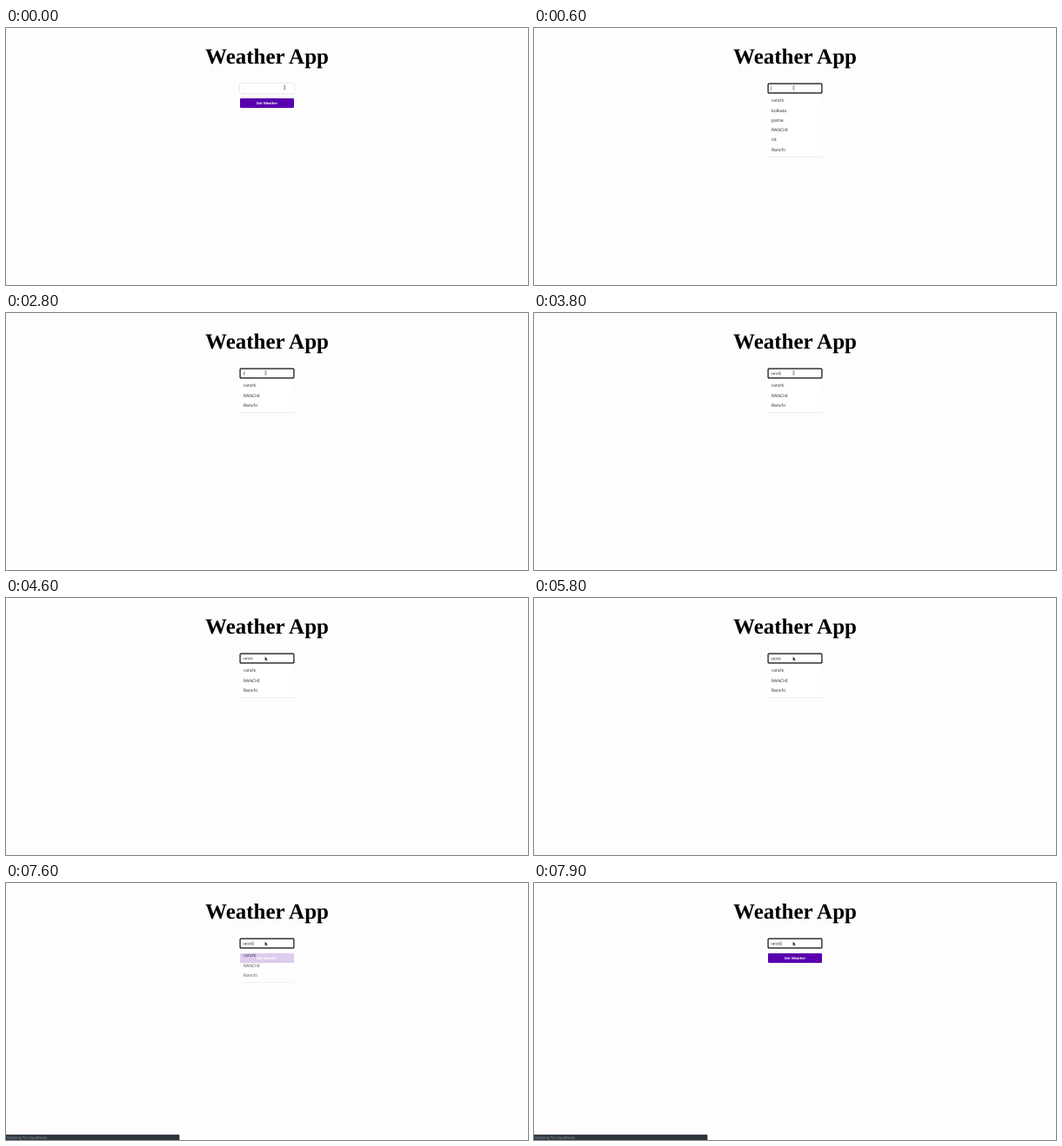
An HTML page for the animation above (8000 ms loop, 600x296 px).

```html
<!DOCTYPE html>
<html lang="en">
<head>
<meta charset="utf-8">
<title>Weather App</title>
<style>
  html, body { margin: 0; width: 100%; height: 100%; overflow: hidden; background: #fdfdfd; }
  svg { display: block; width: 100%; height: 100%; }
  text { text-rendering: geometricPrecision; white-space: pre; }
  .title { font: bold 25px "Liberation Serif", serif; text-anchor: middle; }
  .label { font: bold 4.17px "Liberation Sans", sans-serif; text-anchor: middle; fill: #fff; }
  .typed { font: 4.17px "Liberation Sans", sans-serif; fill: #222; }
  .menu text { font: 500 5px "Noto Sans", sans-serif; fill: #2a2a2a; }
  .menu rect { fill: #fff; filter: drop-shadow(0 .5px .6px rgba(0, 0, 0, .38)); }
  .status text { font: 4.75px "Noto Sans", sans-serif; fill: #8c979e; }
  .field { fill: #fff; filter: drop-shadow(0 0 1px rgba(0, 0, 0, .2)); }

  .anim { animation: 8s step-end infinite; }
  .ring { animation-name: ring; }
  .full { animation-name: full; }
  .short { animation-name: short; }
  .edge { animation-name: type; }
  .caret { animation-name: blink; }
  .squiggle { animation-name: squiggle; }
  .beam { animation-name: beam; }
  .arrow { animation-name: arrow; }
  .status { animation-name: status; }

  @keyframes ring { 0% { opacity: 0 } 7.5%, 100% { opacity: 1 } }
  @keyframes full { 0% { opacity: 0 } 7.5% { opacity: 1 } 35%, 100% { opacity: 0 } }
  @keyframes short {
    0% { opacity: 0 } 35% { opacity: 1 }
    95% { opacity: .8 } 96.25% { opacity: .5 } 97.5% { opacity: .2 } 98.75%, 100% { opacity: 0 }
  }
  @keyframes type {
    0% { transform: translateX(0) }
    35% { transform: translateX(1.45px) }
    37.5% { transform: translateX(3.75px) }
    41.25% { transform: translateX(6.05px) }
    43.75% { transform: translateX(8.15px) }
    47.5% { transform: translateX(10.45px) }
    50%, 100% { transform: translateX(11.6px) }
  }
  @keyframes blink {
    0% { opacity: 0 } 7.5% { opacity: 1 } 15% { opacity: 0 } 22.5% { opacity: 1 }
    30% { opacity: 0 } 35% { opacity: 1 } 57.5% { opacity: 0 } 65% { opacity: 1 }
    72.5% { opacity: 0 } 80% { opacity: 1 } 87.5% { opacity: 0 } 95%, 100% { opacity: 1 }
  }
  @keyframes squiggle { 0% { opacity: 0 } 62.5%, 100% { opacity: 1 } }
  @keyframes beam {
    0% { transform: translate(320.3px, 68.5px); opacity: 1 }
    1.25% { transform: translate(312px, 69px); opacity: 1 }
    2.5% { transform: translate(302px, 69px); opacity: 1 }
    3.75% { transform: translate(298.4px, 68.7px); opacity: 1 }
    57.5%, 100% { transform: translate(298.4px, 68.7px); opacity: 0 }
  }
  @keyframes arrow { 0% { opacity: 0 } 57.5%, 100% { opacity: 1 } }
  @keyframes status { 0% { opacity: 0 } 95%, 100% { opacity: 1 } }
</style>
</head>
<body>
<svg viewBox="0 0 600 296" preserveAspectRatio="none">
  <text class="title" x="300" y="41.3">Weather App</text>

  <rect x="269" y="81" width="62" height="11" rx="1.3" fill="#5800ae"/>
  <text class="label" x="300" y="88">Get Weather</text>

  <rect class="field" x="269" y="64" width="62" height="11" rx="1"/>
  <text class="typed" x="272.5" y="70.7">ranchi</text>
  <path class="anim squiggle" d="M272.5 71.6H284" stroke="#c49a9a" stroke-width=".6" stroke-dasharray="1 .5"/>
  <g class="anim edge">
    <rect x="272.5" y="66" width="14" height="7" fill="#fff"/>
    <path class="anim caret" d="M272.6 67V72" stroke="#333" stroke-width=".5"/>
  </g>

  <g class="menu anim full">
    <rect x="269" y="76" width="62" height="72.3" rx=".8"/>
    <text><tspan x="273" y="85.3">ranchi</tspan><tspan x="273" dy="11.25">kolkata</tspan><tspan x="273" dy="11.25">patna</tspan><tspan x="273" dy="11.25">RANCHI</tspan><tspan x="273" dy="11.25">sd</tspan><tspan x="273" dy="11.25">Ranchi</tspan></text>
  </g>
  <g class="menu anim short">
    <rect x="269" y="76" width="62" height="38.3" rx=".8"/>
    <text><tspan x="273" y="85.3">ranchi</tspan><tspan x="273" dy="11.25">RANCHI</tspan><tspan x="273" dy="11.25">Ranchi</tspan></text>
  </g>
  <rect class="anim ring" x="269.1" y="64.1" width="61.8" height="10.8" rx="1" fill="none" stroke="#111" stroke-width="1.2"/>

  <path class="anim beam" d="M-.9-2.2Q0-2.2 0-1.6Q0-2.2 .9-2.2M0-1.6V1.6M-.9 2.2Q0 2.2 0 1.6Q0 2.2 .9 2.2" fill="none" stroke="#222" stroke-width=".6"/>
  <path class="anim arrow" d="M297.6 67.6V72.2L298.7 71.3L299.4 72.8L300.2 72.4L299.5 71H300.9Z" fill="#111" stroke="#fff" stroke-width=".25"/>

  <g class="anim status">
    <path d="M0 289.8H198.4Q199.4 289.8 199.4 290.8V296H0Z" fill="#2b343f"/>
    <text x="1" y="294.6">Waiting for localhost...</text>
  </g>
</svg>
</body>
</html>
```
